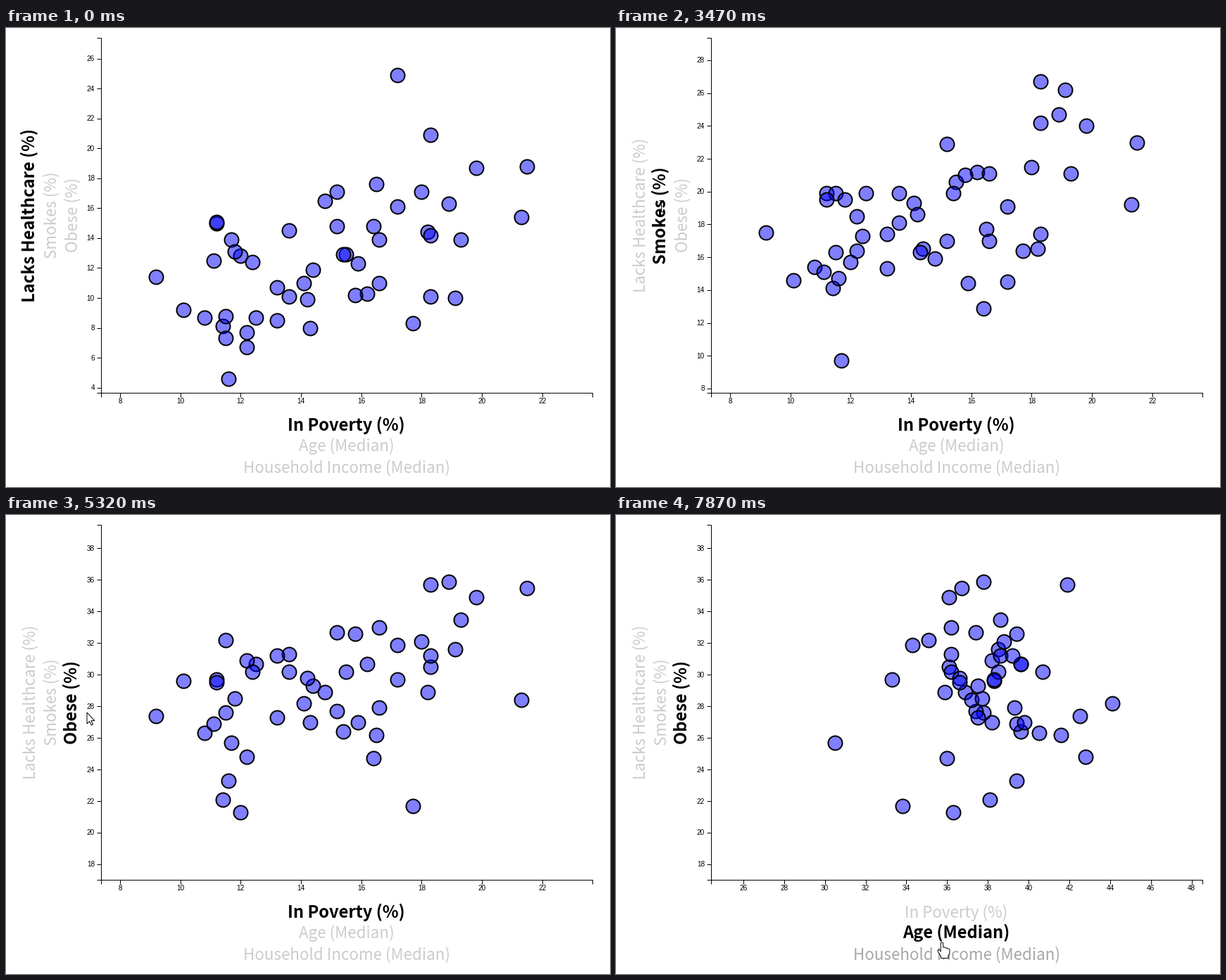
These frames come from a looping animation (858 by 653 pixels, 7.99 s). A matplotlib script:

```python
import numpy as np
import matplotlib.pyplot as plt
from matplotlib.animation import FuncAnimation
from matplotlib.patches import Polygon

WIDTH, HEIGHT, DPI = 858, 653, 100
PX = 72 / DPI
FRAMES, INTERVAL = 235, 34
LEFT, RIGHT, TOP, BOTTOM = 134.5, 832.5, 14, 518.5
MOVE_MS, FADE_MS = 750, 320
FOREVER = 99999

# One value per state, in alphabetical order
poverty = np.array([
    19.3, 11.2, 18.2, 18.9, 16.4, 12, 10.8, 12.5, 17.7, 16.5, 18.3, 11.4, 14.8,
    14.4, 15.2, 12.2, 13.6, 19.1, 19.8, 14.1, 10.1, 11.6, 16.2, 11.5, 21.5, 15.5,
    15.4, 12.4, 15.2, 9.2, 11.1, 21.3, 15.9, 17.2, 11.5, 15.8, 16.6, 16.6, 13.6,
    14.3, 18, 14.2, 18.3, 17.2, 11.7, 12.2, 11.8, 13.2, 18.3, 13.2, 11.2])
age = np.array([
    38.6, 33.3, 36.9, 37.8, 36, 36.3, 40.5, 39.6, 33.8, 41.6, 36.1, 38.1, 35.9,
    37.5, 37.4, 38.2, 36.2, 38.5, 36.1, 44.1, 38.3, 39.4, 39.6, 37.8, 36.7, 38.5,
    39.6, 36.2, 37.4, 42.5, 39.4, 37.2, 38.2, 38.3, 35.1, 39.4, 36.2, 39.3, 40.7,
    39.8, 38.8, 36.6, 38.6, 34.3, 30.5, 42.8, 37.7, 37.5, 41.9, 39.2, 36.6])
healthcare = np.array([
    13.9, 15, 14.4, 16.3, 14.8, 12.8, 8.7, 8.7, 8.3, 17.6, 20.9, 8.1, 16.5,
    11.9, 14.8, 7.7, 14.5, 10, 18.7, 11, 9.2, 4.6, 10.3, 7.3, 18.8, 12.9,
    12.9, 12.4, 17.1, 11.4, 12.5, 15.4, 12.3, 16.1, 8.8, 10.2, 13.9, 11, 10.1,
    8, 17.1, 9.9, 14.2, 24.9, 13.9, 6.7, 13.1, 8.5, 10.1, 10.7, 15.1])
smokes = np.array([
    21.1, 19.9, 16.5, 24.7, 12.9, 15.7, 15.4, 19.9, 16.4, 17.7, 17.4, 14.1, 15.9,
    16.5, 22.9, 18.5, 18.1, 26.2, 24, 19.3, 14.6, 14.7, 21.2, 16.3, 23, 20.6,
    19.9, 17.3, 17, 17.5, 15.1, 19.2, 14.4, 19.1, 19.9, 21, 21.1, 17, 19.9,
    16.3, 21.5, 18.6, 24.2, 14.5, 9.7, 16.4, 19.5, 15.3, 26.7, 17.4, 19.5])
obesity = np.array([
    33.5, 29.7, 28.9, 35.9, 24.7, 21.3, 26.3, 30.7, 21.7, 26.2, 30.5, 22.1, 28.9,
    29.3, 32.7, 30.9, 31.3, 31.6, 34.9, 28.2, 29.6, 23.3, 30.7, 27.6, 35.5, 30.2,
    26.4, 30.2, 27.7, 27.4, 26.9, 28.4, 27, 29.7, 32.2, 32.6, 33, 27.9, 30.2,
    27, 32.1, 29.8, 31.2, 31.9, 25.7, 24.8, 28.5, 27.3, 35.7, 31.2, 29.5])

fig = plt.figure(figsize=(WIDTH / DPI, HEIGHT / DPI), dpi=DPI, facecolor="white")
ax = fig.add_axes([0, 0, 1, 1])
ax.set_xlim(0, WIDTH)
ax.set_ylim(HEIGHT, 0)
ax.axis("off")


def ease(p):
    p = np.clip(p, 0, 1)
    return 4 * p**3 if p < 0.5 else 1 - 4 * (1 - p)**3


def line(xs, ys):
    return ax.plot(xs, ys, color="black", lw=PX, solid_capstyle="butt")[0]


class Axis:
    """A linear axis that slides from one data column to the next."""

    def __init__(self, stages, start, end, horizontal):
        self.stages, self.start, self.end = stages, start, end
        self.horizontal = horizontal
        domains = [self.domain(values) for _, values in stages]
        low, high = min(d[0] for d in domains), max(d[1] for d in domains)
        self.ticks = []
        for value in range(2 * int(np.ceil(low / 2)), int(high) + 1, 2):
            text = ax.text(0, 0, str(value), family="Liberation Sans", fontsize=10 * PX,
                           ha="center" if horizontal else "right", va="baseline")
            self.ticks.append((value, line([], []), text))

    @staticmethod
    def domain(values):
        return values.min() * 0.8, values.max() * 1.1

    def scale(self, values, column):
        low, high = self.domain(column)
        return self.start + (values - low) / (high - low) * (self.end - self.start)

    def update(self, t):
        i = max(k for k, (begin, _) in enumerate(self.stages) if begin <= t)
        begin, new = self.stages[i]
        old = self.stages[max(i - 1, 0)][1]
        e = ease((t - begin) / MOVE_MS) if i else 1

        def mix(a, b):
            return a + (b - a) * e

        for value, mark, text in self.ticks:
            shown = [lo <= value <= hi for lo, hi in (self.domain(old), self.domain(new))]
            alpha = mix(*map(float, shown))
            pos = mix(self.scale(value, old), self.scale(value, new))
            if self.horizontal:
                mark.set_data([pos, pos], [BOTTOM, BOTTOM + 6])
                text.set_position((pos, BOTTOM + 16))
            else:
                mark.set_data([LEFT - 6, LEFT], [pos, pos])
                text.set_position((LEFT - 8.5, pos + 3.5))
            for artist in (mark, text):
                artist.set_alpha(alpha)
                artist.set_visible(alpha > 0.01)
        return mix(self.scale(old, old), self.scale(new, new))


class Label:
    """An axis title: lit while hovered or active, bold while active."""

    def __init__(self, text, x, y, rotation, lit, bold):
        self.lit, self.bold = lit, bold
        self.text = ax.text(x, y, text, family="Noto Sans CJK JP", ha="center",
                            va="baseline", rotation=rotation, rotation_mode="anchor")

    def update(self, t):
        level = 0
        for a, b in self.lit:
            rise, fall = np.clip([(t - a) / FADE_MS, 1 - (t - b) / FADE_MS], 0, 1)
            level = max(level, rise * fall)
        bold = self.bold[0] <= t < self.bold[1]
        self.text.set_color("black" if bold else str(0.8 - 0.8 * level))
        self.text.set_fontweight("bold" if bold else "light")
        self.text.set_fontsize((23.7 if bold else 22.4) * PX)


x_axis = Axis([(0, poverty), (6734, age)], LEFT, RIGHT, True)
y_axis = Axis([(0, healthcare), (2007, smokes), (4390, obesity)], BOTTOM, TOP, False)
line([LEFT, LEFT, RIGHT, RIGHT], [BOTTOM + 6, BOTTOM, BOTTOM, BOTTOM + 6])
line([LEFT - 6, LEFT, LEFT, LEFT - 6], [BOTTOM, BOTTOM, TOP, TOP])

MID_X, MID_Y = (LEFT + RIGHT) / 2, (TOP + BOTTOM) / 2
NEVER = (FOREVER, FOREVER)
labels = [
    Label("Lacks Healthcare (%)", 41, MID_Y, 90, [(-FADE_MS, 1920)], (0, 1920)),
    Label("Smokes (%)", 71, MID_Y, 90, [(1250, 4310)], (1920, 4310)),
    Label("Obese (%)", 101, MID_Y, 90, [(1170, 1245), (3700, FOREVER)], (4310, FOREVER)),
    Label("In Poverty (%)", MID_X, 573, 0, [(-FADE_MS, 6660)], (0, 6660)),
    Label("Age (Median)", MID_X, 602, 0, [(5650, FOREVER)], (6660, FOREVER)),
    Label("Household Income (Median)", MID_X, 632, 0, [(7815, FOREVER)], NEVER),
]

dots = ax.scatter(poverty, healthcare, s=(20 * PX)**2, facecolors=[(0, 0, 1, 0.5)],
                  edgecolors="black", linewidths=2 * PX, zorder=3)

ARROW = np.array([(0, 0), (0, 16), (3.7, 12.5), (6.2, 18), (8.5, 17), (6, 11.6), (11, 11.6)])
HAND = np.array([
    (-1.7, 1), (-0.7, 0), (0.7, 0), (1.7, 1), (1.7, 7), (4.5, 7), (5.5, 8), (8, 8.3),
    (9, 9.2), (10.5, 9.7), (11, 11), (11, 15.5), (9, 19), (9, 22.5), (-1.5, 22.5),
    (-1.5, 19.5), (-5.5, 13.5), (-6, 11.5), (-5, 10.5), (-3.5, 11), (-1.7, 13)])
BEAM = np.array([(-3, -8), (3, -8), (0, -8), (0, 8), (-3, 8), (3, 8)])

# (time, x, y) of the pointer's hot spot
PATH = [(560, 340, 655), (1350, 62, 250), (1700, 62, 250), (1900, 63, 253),
        (3440, 63, 253), (3800, 95, 253), (5270, 95, 253), (5321, 115, 281),
        (5800, 458, 588), (6150, 458, 588), (6200, 460, 589), (7690, 460, 589),
        (7871, 463, 608)]
SHAPES = [(0, None), (600, ARROW), (1250, HAND), (1920, BEAM), (3600, ARROW), (3660, HAND),
          (4310, BEAM), (5287, ARROW), (5650, HAND), (6660, BEAM), (7800, HAND)]

pointer = ax.add_patch(Polygon(ARROW, closed=True, fc="white", ec="black", lw=PX, zorder=5))
beam = line([], [])
beam.set_zorder(5)


def pointer_position(t):
    times = [key[0] for key in PATH]
    i = int(np.clip(np.searchsorted(times, t) - 1, 0, len(PATH) - 2))
    (t0, *a), (t1, *b) = PATH[i], PATH[i + 1]
    p = np.clip((t - t0) / (t1 - t0), 0, 1)
    return np.array(a) + (np.array(b) - a) * p * p * (3 - 2 * p)


def update_pointer(t):
    shape = [s for begin, s in SHAPES if begin <= t][-1]
    beam.set_visible(shape is BEAM)
    pointer.set_visible(shape is ARROW or shape is HAND)
    if shape is None:
        return
    points = shape + pointer_position(t)
    if shape is BEAM:
        beam.set_data(*points.T)
    else:
        pointer.set_xy(points)


def update(frame):
    t = (frame + 0.5) * INTERVAL
    xs, ys = x_axis.update(t), y_axis.update(t)
    dots.set_offsets(np.column_stack([xs, ys]))
    for label in labels:
        label.update(t)
    update_pointer(t)
    return []


anim = FuncAnimation(fig, update, frames=FRAMES, interval=INTERVAL,
                     init_func=lambda: update(0), repeat=True, repeat_delay=0, blit=False)
plt.show()
```
